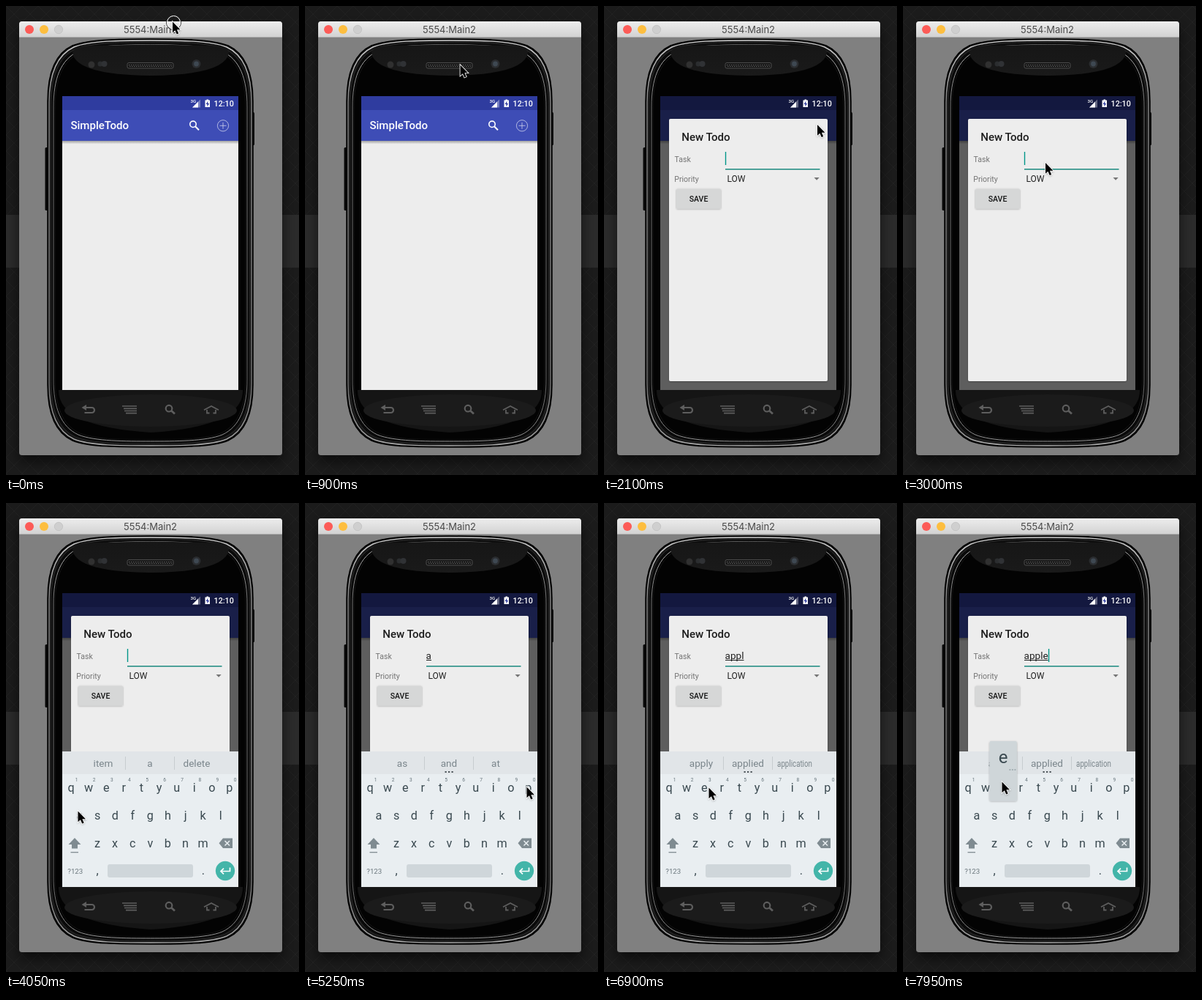
These frames come from a looping animation (401 by 640 pixels, 8 s). An HTML page:

```html
<!DOCTYPE html>
<html lang="en">
<head>
<meta charset="utf-8">
<title>Todo app demo</title>
<style>
html, body { margin: 0; width: 100%; height: 100%; overflow: hidden; background: #1b1b1b; }
svg { display: block; width: 100vw; height: 100vh; font-family: Roboto, sans-serif; }
.mid { text-anchor: middle; }
.med { font-weight: 500; }
</style>
</head>
<body>
<svg viewBox="0 0 401 640" xmlns="http://www.w3.org/2000/svg">
  <defs>
    <pattern id="weave" width="22" height="22" patternUnits="userSpaceOnUse">
      <path d="M0 0L22 22M22 0L0 22" stroke="#222" stroke-width=".8"/>
    </pattern>
    <linearGradient id="bar" x2="0" y2="1">
      <stop stop-color="#ededed"/><stop offset="1" stop-color="#d2d2d2"/>
    </linearGradient>
    <linearGradient id="rim" x2="0" y2="1">
      <stop stop-color="#d0d0d0"/><stop offset=".15" stop-color="#808080"/>
      <stop offset=".85" stop-color="#6c6c6c"/><stop offset="1" stop-color="#a8a8a8"/>
    </linearGradient>
    <linearGradient id="gloss" x2="0" y2="1">
      <stop stop-color="#161616"/><stop offset="1" stop-color="#1a1a1a"/>
    </linearGradient>
    <linearGradient id="drop" x2="0" y2="1">
      <stop stop-opacity=".32"/><stop offset="1" stop-opacity="0"/>
    </linearGradient>
    <filter id="soft" x="-20%" y="-20%" width="140%" height="140%">
      <feDropShadow dx="0" dy=".7" stdDeviation=".8" flood-opacity=".3"/>
    </filter>
    <filter id="deep" x="-20%" y="-20%" width="140%" height="140%">
      <feDropShadow dx="0" dy="8" stdDeviation="9" flood-opacity=".6"/>
    </filter>
    <clipPath id="screen"><rect x="77" y="123" width="241" height="401"/></clipPath>
  </defs>

  <!-- desktop and window -->
  <rect width="401" height="640" fill="#1b1b1b"/>
  <rect width="401" height="640" fill="url(#weave)"/>
  <rect y="285" width="401" height="72" fill="#2b2b2b"/>
  <rect x="18" y="21" width="360" height="592" rx="4" fill="#808080" filter="url(#deep)"/>
  <path d="M18 42.5V25a4 4 0 0 1 4-4H374a4 4 0 0 1 4 4V42.5Z" fill="url(#bar)"/>
  <path d="M18 42.5H378" stroke="#b0b0b0"/>
  <circle cx="32" cy="32" r="6" fill="#fc5b57"/>
  <circle cx="52" cy="32" r="6" fill="#fdbe3f"/>
  <circle cx="72" cy="32" r="5.7" fill="#cfcfcf" stroke="#bdbdbd" stroke-width=".7"/>
  <text class="mid" x="197.5" y="36.7" font-size="13" fill="#4a4a4a" font-family="Inter, sans-serif">5554:Main2</text>

  <!-- phone -->
  <rect x="53.5" y="193" width="6" height="86" rx="1.5" fill="#070707"/>
  <rect x="335" y="145" width="5" height="45" rx="1.5" fill="#070707"/>
  <g id="shell"></g>
  <path d="M91 64Q92 56 112 54.5Q198 51 284 54.5Q304 56 305 64Q300 94 198 95Q96 94 91 64Z" fill="url(#gloss)"/>
  <circle cx="117" cy="80" r="4.5" fill="#303030"/>
  <circle cx="129" cy="79" r="3.5" fill="#2b2d2f"/><circle cx="134.5" cy="79" r="4" fill="#303235"/>
  <rect x="166" y="77.5" width="63" height="7.5" rx="2" fill="#161616" stroke="#4c4c4c"/>
  <path d="M168 80.5H227M169 82.5H227" stroke="#626262" stroke-dasharray="1.5 1.5"/>
  <circle cx="260.5" cy="79" r="6" fill="#2b2d30"/><circle cx="260.5" cy="79" r="3.4" fill="#3e4852"/>
  <path d="M72 524H324Q325 574 198 582Q71 574 72 524Z" fill="#151515"/>
  <ellipse cx="198" cy="552" rx="118" ry="22" fill="#1b1b1b"/>
  <g fill="none" stroke="#5e5e5e" stroke-width="2.2">
    <path d="M108 548H117.500A3.500 3.500 0 0 1 117.500 555H107.500"/>
    <path d="M110 544V552L103.500 548Z" fill="#5e5e5e" stroke="none"/>
    <path d="M159 546H179M161 549.300H179M162 552.500H179M164 555.700H179" stroke-width="1.700"/>
    <circle cx="223" cy="549.200" r="4.300"/><path d="M226.500 552.500L231 556.500" stroke-width="2.800"/>
    <path d="M271 551.300L281 546L291 551.300M275 551V555.500H278.500M283.500 555.500H287V551" stroke-width="1.800"/>
  </g>

  <g clip-path="url(#screen)">
    <!-- list screen -->
    <rect x="77" y="123" width="241" height="401" fill="#ededed"/>
    <rect x="77" y="184" width="241" height="4.5" fill="url(#drop)"/>
    <rect x="77" y="142" width="241" height="42" fill="#3e4db6"/>
    <rect x="77" y="123" width="241" height="19" fill="#2f3c9f"/>
    <text class="med" x="88.4" y="168.4" font-size="15.06" fill="#fff">SimpleTodo</text>
    <g fill="none" stroke="#fff">
      <circle cx="256" cy="161.3" r="4.2" stroke-width="1.6"/>
      <path d="M259.200 164.500L264 169.300" stroke-width="2"/>
      <g stroke="#cdd1ec" stroke-width=".8">
        <circle cx="297" cy="163.3" r="7.6"/><path d="M292.500 163.300H301.500M297 158.800V167.800"/>
      </g>
    </g>

    <!-- new item dialog -->
    <g id="dialog">
      <rect x="77" y="123" width="241" height="401" opacity=".6"/>
      <rect x="89" y="154" width="217" height="358" rx="2" fill="#ededed" filter="url(#soft)"/>
      <text class="med" x="106.2" y="183.8" font-size="15.06" fill="#1d1d1d">New Todo</text>
      <g font-size="10.54" fill="#747474">
        <text x="96.6" y="213">Task</text><text x="96.3" y="240">Priority</text>
      </g>
      <path d="M166 222.700H295.500" stroke="#1b8a80" stroke-width="1.500"/>
      <text id="entry" x="165.6" y="213" font-size="13.55" fill="#222"></text>
      <path id="under" stroke="#222"/>
      <path id="caret" stroke="#009688" stroke-width="1.4"/>
      <text x="168.4" y="240" font-size="12.05" fill="#222">LOW</text>
      <path d="M287.500 234H294.700L291.100 237.700Z" fill="#757575"/>
      <rect x="99" y="249.5" width="61" height="27" rx="1.5" fill="#d6d7d7" filter="url(#soft)"/>
      <text class="mid med" x="129.5" y="267" font-size="10.54" fill="#151515">SAVE</text>
    </g>

    <!-- status icons stay above the dimming -->
    <g fill="#fff">
      <text class="med" x="252.5" y="131.5" font-size="6.2">3G</text>
      <path d="M266 127.500V138.500H255Z" opacity=".35"/><path d="M263 130.500V138.500H255Z"/>
      <path d="M274.500 127.500H277V128.500H279V138H272.500V128.500H274.500Z"/>
      <path d="M276.400 129.700L273.600 134H275.400V137.300L278.200 133H276.400Z" fill="#2f3c9f"/>
      <text class="med" x="284.6" y="136.8" font-size="10.7">12:10</text>
    </g>

    <!-- keyboard -->
    <g id="keyboard">
      <rect x="77" y="339" width="241" height="185" fill="#e9eef1"/>
      <rect x="77" y="339" width="241" height="31" fill="#e1e5e8"/>
      <path d="M163.500 346V364M230.500 346V364" stroke="#c7cccf"/>
      <g id="words" class="mid" fill="#7a858b"></g>
      <path id="more" d="M191.500 367H193.700M196 367H198.200M200.500 367H202.700" stroke="#4a5358" stroke-width="2"/>
      <g id="keys" class="mid" font-size="16.2" fill="#3a4950"></g>
      <path d="M94 457L102.500 466H98V471.500H90V466H85.500Z" fill="#7f8b91"/>
      <path d="M88.500 476.700H99" stroke="#7f8b91" stroke-width="1.300"/>
      <path d="M297 457.500H310V471H297L291.500 464.200Z" fill="#7f8b91"/>
      <path d="M299.500 461L306 467.500M306 461L299.500 467.500" stroke="#e9eef1" stroke-width="1.500"/>
      <text class="mid" x="94.8" y="505.8" font-size="9.7" fill="#6c787e">?123</text>
      <rect x="139" y="493" width="117" height="18" rx="3" fill="#cfd6da"/>
      <circle cx="300" cy="502" r="13.2" fill="#43b5a9"/>
      <path d="M306.500 497.500V502.500H294.500M298 498.700L294 502.500L298 506.300" fill="none" stroke="#fff" stroke-width="1.700"/>
    </g>
    <g id="popup">
      <rect width="37.5" height="81.5" rx="2" fill="#cfd6d9" filter="url(#soft)"/>
      <text id="bigKey" class="mid" x="18.8" y="29.5" font-size="24" fill="#3a4950"></text>
      <path d="M27 39H29M30.500 39H32.500M34 39H36" stroke="#98a3a8" stroke-width="1.500"/>
    </g>
  </g>

  <g id="pointer">
    <g id="ring" fill="none"><circle cx="2" cy="1.5" r="10" stroke="#222"/><circle cx="2" cy="1.5" r="9" stroke="#fff"/></g>
    <path d="M.500 .500V15.300L3.900 12.200L6.200 17.500L8.700 16.400L6.400 11.200H11Z" fill="#000" stroke="#fff"
      stroke-width="1.6" paint-order="stroke" filter="url(#soft)"/>
  </g>
</svg>
<script>
const $ = id => document.getElementById(id);
const LOOP = 8000, STEP = 150;
const show = (id, on) => $(id).setAttribute('display', on ? 'inline' : 'none');
const move = (id, x, y) => $(id).setAttribute('transform', `translate(${x} ${y})`);

// Phone outline shrunk by an inset: one shoulder curve, mirrored into each corner.
const shoulder = [[0, 85], [0, 46], [10, 20], [34, 9], [56, 0], [100, 0], [140.5, 0]];
function outline(i) {
  const corner = (right, bottom) => shoulder.map(([x, y]) => [
    right ? 338 - i - Math.min(x, 140.5 - i) : 57 + i + Math.min(x, 140.5 - i),
    bottom ? 602 - i - y : 45 + i + y
  ]);
  const curve = pts => `${pts[0]}C${pts.slice(1).join(' ')}`;
  return 'M' + curve(corner(0, 0)) + 'L' + curve(corner(1, 0).reverse()) +
    'L' + curve(corner(1, 1)) + 'L' + curve(corner(0, 1).reverse()) + 'Z';
}
$('shell').innerHTML = [
  [0, '#0c0c0c', '#000', 1.5], [2, '#161616', 'url(#rim)', 1.5], [4.7, '#0a0a0a', '#2c2c2c', 1],
  [8, '#000', 'url(#rim)', 0.9], [10, '#030303', '#151515', 1]
].map(([i, fill, line, w]) => `<path d="${outline(i)}" fill="${fill}" stroke="${line}" stroke-width="${w}"/>`).join('');

const PITCH = 24.1;
const keyAt = {};
let keyMarkup = '';
[['qwertyuiop', 89, 394], ['asdfghjkl', 101, 432], ['zxcvbnm', 125, 470]].forEach(([row, x0, y], r) => {
  [...row].forEach((c, i) => {
    const x = x0 + PITCH * i;
    keyAt[c] = [x, y];
    keyMarkup += `<text x="${x}" y="${y}">${c}</text>`;
    if (r === 0) keyMarkup += `<text x="${x + 7.6}" y="380" font-size="6.6" fill="#65737a">${(i + 1) % 10}</text>`;
  });
});
$('keys').innerHTML = keyMarkup + '<text x="125" y="507">,</text><text x="270" y="507">.</text>';

// Pointer waypoints: step, x, y.
const path = [
  [0, 227.5, 21], [3, 227.5, 21], [4, 224, 27], [5, 211, 48], [6, 212, 80], [7, 232, 112], [8, 259, 138],
  [9, 282, 155], [10, 291.5, 161.5], [14, 291.5, 161.5], [15, 272, 185], [16, 232, 219], [17, 201, 228],
  [20, 194.5, 213.5], [24, 194.5, 213.5], [25, 160, 290], [26, 112, 398], [27, 98, 420], [30, 98, 420],
  [31, 150, 402], [32, 262, 382], [33, 389, 385], [34, 340, 391], [35, 303, 387], [39, 303, 387],
  [40, 295, 415], [41, 292, 422], [42, 250, 410], [43, 193, 398], [46, 143, 388], [48, 142, 387.5],
  [49, 141, 387], [50, 141, 387], [51, 135, 380]
];
const clicks = [0, 11, 22, 28, 37, 39, 51];
// Step, typed text, suggestions.
const typing = [
  [0, '', 'item a delete'], [30, 'a', 'as and at'], [38, 'ap', 'app apps apart'],
  [40, 'app', 'apparel apps appeal'], [42, 'appl', 'apply applied application'],
  [53, 'apple', 'apply applied application']
];
// First step, last step, key.
const presses = [[29, 30, 'a'], [38, 40, 'p'], [41, 41, 'l'], [52, 53, 'e']];
const DIALOG = 13, KEYBOARD = 23;

function pointerAt(n) {
  const k = path.findIndex(p => p[0] > n);
  if (k < 0) return path[path.length - 1].slice(1);
  const [a, ax, ay] = path[k - 1], [b, bx, by] = path[k];
  const f = (n - a) / (b - a);
  return [ax + (bx - ax) * f, ay + (by - ay) * f];
}

// Long suggestions are set in a condensed style.
function suggestion(word, i) {
  const long = word.length > 9;
  return `<text transform="translate(${133 + 64 * i} 360) scale(${long ? 0.78 : 1} 1)" ` +
    `font-size="${long ? 12.5 : 13.55}">${word}</text>`;
}

let drawn = -1;
function draw(n) {
  const [since, text, words] = typing.filter(s => s[0] <= n).pop();
  show('dialog', n >= DIALOG);
  $('dialog').setAttribute('opacity', n === DIALOG ? 0.5 : 1);
  show('keyboard', n >= KEYBOARD);
  move('keyboard', 0, n === KEYBOARD ? 70 : 0);

  $('entry').textContent = text;
  const end = 165.6 + (text ? $('entry').getComputedTextLength() : 0);
  $('under').setAttribute('d', text ? `M166 214.5H${end}` : '');
  $('caret').setAttribute('d', `M${end + 0.9} 199V217`);
  const age = (n - (since || DIALOG)) * STEP;
  show('caret', age % 1000 < 500);

  $('words').innerHTML = words.split(' ').map(suggestion).join('');
  show('more', text);

  const press = presses.find(p => n >= p[0] && n <= p[1]);
  show('popup', press);
  if (press) {
    const [x, y] = keyAt[press[2]];
    move('popup', Math.min(x - 18.8, 278.5), y - 69);
    $('bigKey').textContent = press[2];
  }
  move('pointer', ...pointerAt(n));
  show('ring', clicks.includes(n));
}

function tick() {
  const n = Math.floor((performance.now() % LOOP) / STEP);
  if (n !== drawn) draw(drawn = n);
  requestAnimationFrame(tick);
}
tick();
</script>
</body>
</html>
```
